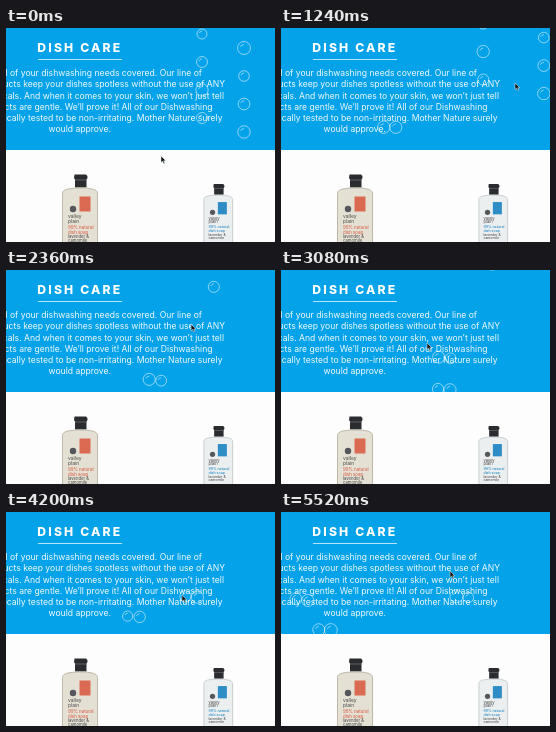
These frames come from a looping animation (269x214 px, 5560 ms). An HTML page:

```html
<!DOCTYPE html>
<html lang="en">
<head>
<meta charset="utf-8">
<title>Dish care</title>
<style>
html, body { margin: 0; width: 100%; height: 100%; overflow: hidden; background: #fdfdfd; }
svg { display: block; width: 269px; height: 214px; font-family: Inter, "Open Sans", sans-serif; }
.title { font-size: 12.2px; font-weight: 800; letter-spacing: 2.15px; fill: #fff; }
.copy { font-size: 8.6px; fill: #f2faff; text-anchor: end; }
.brand { font-size: 5px; fill: #4b4b4b; }
.kind { font-size: 4.4px; font-weight: 500; fill: var(--accent); }
.scent { font-size: 4.2px; fill: #444; }
.bubble { fill: none; stroke: #fff; stroke-width: .9; }
.amber { --accent: #db6a52; --glass: #e4e0d4; --edge: #bdb8a9; }
.clear { --accent: #2f8dc6; --glass: #eceff0; --edge: #c0c7cb; }
</style>
</head>
<body>
<svg viewBox="0 0 269 214">
  <defs>
    <!-- origin: left end of the shoulder -->
    <g id="bottle">
      <path d="M12.5 -14H24Q26 -13 25.5 -10.5L24.5 -9V-1H13V-9L12 -10.5Z" fill="#2b2c30"/>
      <path d="M13 -8.5H24.5" stroke="#6a6c70" stroke-width=".8"/>
      <path d="M.5 60V5Q.5 1.5 6 .5L13 -.5H24.5L30 .5Q35.5 1.5 35.5 5V60Z" fill="var(--glass)" stroke="var(--edge)"/>
      <rect x="17.5" y="8" width="11" height="15" fill="var(--accent)"/>
      <circle cx="11" cy="20.5" r="3.2" fill="#55575c"/>
      <text class="brand" x="6" y="29.5">valley</text>
      <text class="brand" x="6" y="34">plain</text>
      <text class="kind" x="6" y="40">99% natural</text>
      <text class="kind" x="6" y="45">dish soap</text>
      <text class="scent" x="6" y="49.5">lavender &amp;</text>
      <text class="scent" x="6" y="53.5">camomile</text>
    </g>
  </defs>
  <rect width="269" height="214" fill="#fdfdfd"/>
  <rect width="269" height="122" fill="#04a2e8"/>
  <text class="title" x="31.3" y="24">DISH CARE</text>
  <rect x="32" y="31" width="84" height="1" fill="#b9e4f8"/>
  <g class="copy">
    <text x="196" y="48">We’ve got all of your dishwashing needs covered. Our line of</text>
    <text x="219" y="59.2">products keep your dishes spotless without the use of ANY</text>
    <text x="218" y="70.5">chemicals. And when it comes to your skin, we won’t just tell</text>
    <text x="206.5" y="81.7">products are gentle. We’ll prove it! All of our Dishwashing</text>
    <text x="216.5" y="93">clinically tested to be non-irritating. Mother Nature surely</text>
    <text x="105" y="104">would approve.</text>
  </g>
  <use href="#bottle" class="amber" transform="translate(56 160.5)"/>
  <use href="#bottle" class="clear" transform="translate(197.5 167.5) scale(.82)"/>
  <g id="foam"></g>
  <path id="cursor" d="M0 0V6.6L1.6 5.2L2.7 7.7L3.8 7.2L2.7 4.8H4.8Z" fill="#111" stroke="#e8f4fa" stroke-width=".5"/>
</svg>
<script>
const LOOP = 5560, STEP = 40;
const RISE = 31, DRIFT = 20; // px per second
const LIFE = 1180, FLOOR = 119;

// cursor: time, x, y
const path = [
  [0, 155, 128], [800, 247, 73], [1680, 221, 37], [3080, 146, 73],
  [4200, 176, 83], [4920, 163, 74], [5520, 169, 59]
];

// pairs leaving the floor: time, x
const pairs = [
  [600, 90], [2050, 137], [3080, 157], [3720, 112], [4400, 153], [4480, -6], [5480, 37]
];

let seed = 7;
const random = () => (seed = seed * 16807 % 2147483647) / 2147483647;

const foam = document.getElementById("foam");
const cursor = document.getElementById("cursor");
const place = (el, x, y) =>
  el.setAttribute("transform", `translate(${x.toFixed(2)} ${y.toFixed(2)})`);

function bubble(birth, x, y, drift, life) {
  const r = 5 + random() * 1.6, h = r * .55;
  const ring = document.createElementNS("http://www.w3.org/2000/svg", "path");
  ring.setAttribute("class", "bubble");
  ring.setAttribute("d", `M${-r} 0A${r} ${r} 0 1 1 ${r} 0A${r} ${r} 0 1 1 ${-r} 0M${-h} ${-h * .3}Q${-h * .7} ${-h} 0 ${-h}`);
  foam.appendChild(ring);
  return { birth, x, y, drift, life, ring };
}

// two columns already rising when the loop starts
const columns = Array.from({ length: 8 }, (_, i) => i % 2
  ? bubble(0, 238, 6 + 14 * i, DRIFT, LOOP)
  : bubble(0, 196, 6 + 14 * i, DRIFT / 4, LOOP));

const bubbles = columns.concat(pairs.flatMap(([time, x]) => [
  bubble(time, x, FLOOR, DRIFT, LIFE),
  bubble(time, x + 12, FLOOR + random() * 4 - 2, DRIFT, LIFE)
]));

function cursorAt(t) {
  const i = Math.max(1, path.findIndex(p => p[0] >= t));
  const [a, b] = [path[i - 1], path[i]];
  const k = (t - a[0]) / (b[0] - a[0]), e = k * k * (3 - 2 * k);
  return [1, 2].map(n => a[n] + (b[n] - a[n]) * e);
}

function draw(t) {
  place(cursor, ...cursorAt(t));
  for (const { birth, x, y, drift, life, ring } of bubbles) {
    const age = t - birth, s = age / 1000;
    const shown = age >= 0 && age < life;
    ring.setAttribute("opacity", shown ? .6 : 0);
    place(ring, x + drift * s, y - RISE * s);
  }
}

const start = performance.now();
function tick() {
  const t = (performance.now() - start) % LOOP;
  draw(Math.floor(t / STEP) * STEP);
  requestAnimationFrame(tick);
}
tick();
</script>
</body>
</html>
```
